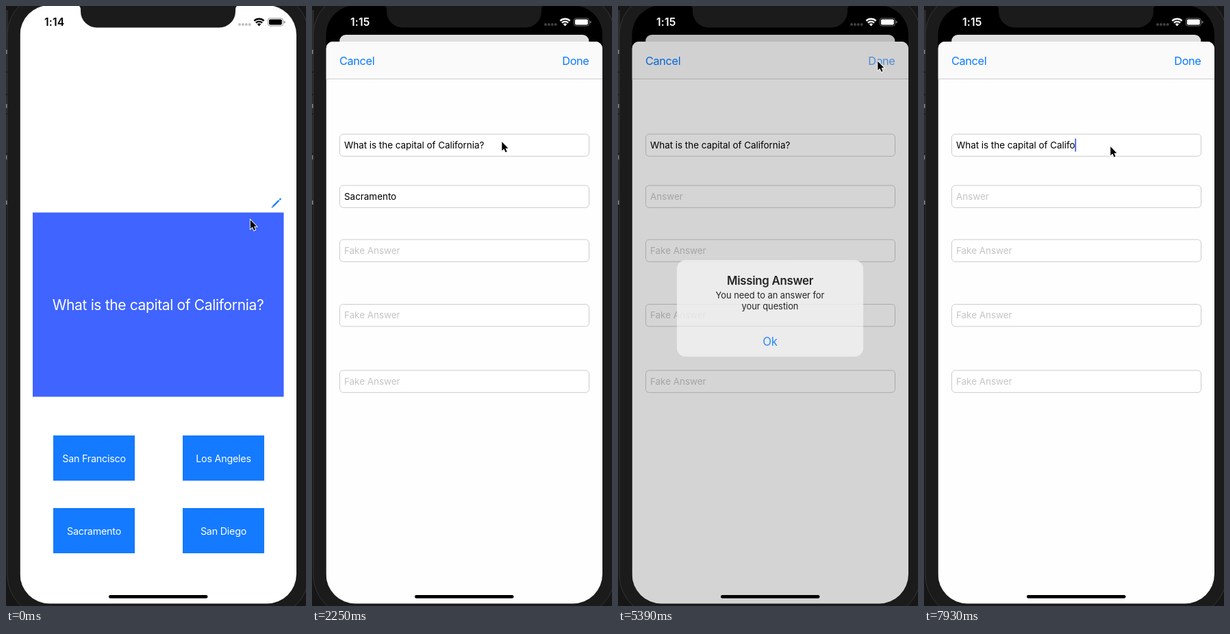
An HTML page that plays this animation: 438x876 px, repeating every 8000 ms.

```html
<!DOCTYPE html>
<html lang="en">
<head>
<meta charset="utf-8">
<title>Flashcard editor</title>
<style>
html, body { margin: 0; width: 100%; height: 100%; overflow: hidden; background: #111; }
svg { display: block; width: 438px; height: 876px; font-family: Inter, sans-serif; }
.mid { text-anchor: middle; }
.question { font-size: 21px; letter-spacing: -.35px; fill: #fff; }
.choice { font-size: 14.3px; letter-spacing: -.22px; fill: #fff; }
.field { font-size: 13.5px; letter-spacing: -.05px; }
.nav { font-size: 16.3px; letter-spacing: -.35px; fill: #0a7aff; }
.title { font-size: 16.3px; font-weight: 600; letter-spacing: -.27px; }
.message { font-size: 12.5px; letter-spacing: -.04px; }
.clock { font-size: 15.7px; font-weight: 600; letter-spacing: .15px; }
</style>
</head>
<body>
<svg viewBox="0 0 438 876">
  <defs>
    <clipPath id="screen"><rect x="20.5" y="-1" width="403.5" height="873.6" rx="43"/></clipPath>
  </defs>

  <rect width="438" height="876" fill="#161616"/>
  <rect y="6" width="3" height="284" fill="#2a2a2a"/>
  <path d="M0 96.5h3M0 129.5h3M0 157.5h3M0 215.5h3" stroke="#000"/>
  <path d="M0 67h2M0 146h2M0 221h1.5M0 287h2" stroke="#aaa" stroke-width="6" opacity=".7"/>
  <rect x="2" y="-18" width="440" height="909" rx="60" fill="#1b1b1b" stroke="#343434"/>

  <g clip-path="url(#screen)">
    <rect width="438" height="876"/>
    <g id="home">
      <rect id="page" width="403.5" height="880" fill="#fff"/>
      <g transform="translate(-20.5 0)">
        <g id="pencil" stroke="#147aff">
          <path d="M390 292.4L398.6 283.8" stroke-width="2.3"/>
          <path d="M388 294.4L390.2 292.2" stroke-width="1.4"/>
          <path d="M399.4 283L401.2 281.2" stroke-width="2.4"/>
        </g>
        <rect x="39" y="301.5" width="366.5" height="269" fill="#3f64ff"/>
        <text class="question mid" x="222" y="444">What is the capital of California?</text>
        <g id="choices"></g>
      </g>
    </g>
    <rect id="shade" width="438" height="876"/>

    <g id="sheet">
      <rect x="20.5" width="403.5" height="900" rx="10" fill="#fefefe"/>
      <path d="M20.5 54V10a10 10 0 0 1 10-10H414a10 10 0 0 1 10 10V54z" fill="#fafafa"/>
      <path d="M20 54.5H424" stroke="#cfcfcf"/>
      <text class="nav" x="40" y="33.5">Cancel</text>
      <text class="nav" id="done" x="404.5" y="33.5" text-anchor="end">Done</text>
      <g id="fields"></g>
      <rect id="caret" width="1.8" height="19" fill="#3d62e6"/>
    </g>

    <rect id="dim" width="438" height="876"/>
    <g id="alert">
      <rect x="90.2" y="373.2" width="263.6" height="136.6" rx="12.5" fill="#f0f1f0"/>
      <path d="M90.2 466.8H353.8" stroke="#d9d9db" stroke-width=".6"/>
      <text class="title mid" x="222" y="408">Missing Answer</text>
      <text class="message mid" x="222" y="427.6">You need to an answer for</text>
      <text class="message mid" x="222" y="443.2">your question</text>
      <text class="nav mid" id="ok" x="222" y="494.4">Ok</text>
    </g>

    <g id="status">
      <text class="clock" id="clock" x="56" y="29"></text>
      <path d="M341 27h.01M345.9 27h.01M350.8 27h.01M355.7 27h.01" stroke="currentColor"
        stroke-width="4" stroke-linecap="round" opacity=".25"/>
      <g fill="none" stroke="currentColor" stroke-width="2.3">
        <path d="M362.4 21.7a10 10 0 0 1 14.2 0"/>
        <path d="M364.9 24.6a6.5 6.5 0 0 1 9.2 0"/>
      </g>
      <path d="M369.5 29.4L366.9 26.6a3.7 3.7 0 0 1 5.2 0z" fill="currentColor"/>
      <rect x="382.4" y="17.9" width="22" height="11.2" rx="3.2" fill="none" stroke="currentColor" opacity=".4"/>
      <rect x="384" y="19.5" width="18.8" height="8" rx="1.8" fill="currentColor"/>
      <path d="M405.7 21.6a2 2 0 0 1 0 4z" fill="currentColor" opacity=".45"/>
    </g>
    <rect x="150" y="860" width="144.5" height="4.8" rx="2.4"/>
  </g>

  <path d="M103 -2Q109 -1 109 6V8A23.5 23.5 0 0 0 132.5 31.5H311.5A23.5 23.5 0 0 0 335 8V6Q335 -1 341 -2z" fill="#1b1b1b"/>
  <g id="mouse">
    <path d="M.8 1.2V14.3L3.8 11.6L6 16.6L8.1 15.7L6 10.8H9.9z"
      stroke="#fff" stroke-width="1.8" paint-order="stroke"/>
  </g>
</svg>

<script>
const LOOP = 8000;
const QUESTION = 'What is the capital of California?';
const ANSWER = 'Sacramento';
const $ = id => document.getElementById(id);
const set = (el, attrs) => { for (const k in attrs) el.setAttribute(k, attrs[k]); };
const ramp = (t, from, to) => Math.min(1, Math.max(0, (t - from) / (to - from)));
const smooth = u => u * u * (3 - 2 * u);

function add(parent, tag, attrs, text = '') {
  const el = document.createElementNS('http://www.w3.org/2000/svg', tag);
  set(el, attrs);
  el.textContent = text;
  parent.append(el);
  return el;
}

['San Francisco', 'Los Angeles', 'Sacramento', 'San Diego'].forEach((name, i) => {
  const x = 69 + 189 * (i % 2), y = 627 + 106 * (i >> 1);
  add($('choices'), 'rect', { x, y, width: 119, height: 66, fill: '#147aff' });
  add($('choices'), 'text', { class: 'choice mid', x: x + 59.5, y: y + 38.6 }, name);
});

const fieldY = [135, 210, 289, 383.5, 480];
const inputs = fieldY.map(y => {
  add($('fields'), 'rect', { x: 40.5, y, width: 364, height: 32.3, rx: 5, fill: '#fff', stroke: '#cbcbcb' });
  return add($('fields'), 'text', { class: 'field', x: 47, y: y + 20.8, fill: '#c5c5c7' }, 'Fake Answer');
});

// Pointer moves between a few stops
const moves = [
  { from: 0, to: 150, x: 360, y: 302 },
  { from: 300, to: 750, x: 391.5, y: 286.5 },
  { from: 1800, to: 2250, x: 276.5, y: 197 },
  { from: 2250, to: 2700, x: 194.5, y: 287 },
  { from: 4490, to: 5090, x: 378.5, y: 79.5 },
  { from: 5540, to: 6140, x: 222, y: 487 },
  { from: 6140, to: 6430, x: 251.5, y: 296.5 },
  { from: 6430, to: 6580, x: 262, y: 240 },
  { from: 6730, to: 6880, x: 271.5, y: 204 }
];

function pointer(t) {
  let x = 356, y = 311;
  for (const m of moves) {
    const u = smooth(ramp(t, m.from, m.to));
    x += (m.x - x) * u;
    y += (m.y - y) * u;
  }
  return `translate(${x} ${y})`;
}

// Time snapped to the screen's refresh steps
function snap(t) {
  const base = t < 4190 ? 0 : t < 6430 ? 4190 : 6430;
  return base + Math.floor((t - base) / 150) * 150;
}

// Remaining part of a critically damped spring, 1 to 0
function rest(t, start, end = Infinity) {
  if (t >= end) return 0;
  const x = Math.max(0, t - start) * .0112;
  return (1 + x) * Math.exp(-x);
}

// Opacity of a tapped control that fades back
const tapped = (t, start) => t < start ? 1 : .3 + .7 * ramp(t, start, start + 300);

// Text after the delete key goes down, then repeats once held
function erase(text, t, start, hold) {
  const held = t - start - hold;
  const gone = t < start ? 0 : held < 0 ? 1 : 2 + Math.floor(held / 70);
  return text.slice(0, Math.max(0, text.length - gone));
}

function fill(input, value, hint) {
  input.textContent = value || hint;
  set(input, { fill: value ? '#000' : '#c5c5c7' });
}

function drawSheet(t) {
  const left = rest(t, 1017, 1650), open = 1 - left;
  const inset = 19.7 * open;
  set($('home'), { transform: `translate(${20.5 + inset} ${42 * open}) scale(${1 - 2 * inset / 403.5})` });
  set($('page'), { rx: open > 0 ? 10 : 0 });
  set($('shade'), { opacity: .12 * open });
  set($('sheet'), { transform: `translate(0 ${52 + 824 * left})` });
  set($('pencil'), { opacity: tapped(t, 900) });
  set($('done'), { opacity: tapped(t, 5240) });

  const grey = Math.round(255 * ramp(t, 1150, 1530));
  const tone = `rgb(${grey},${grey},${grey})`;
  set($('status'), { color: tone, fill: tone });
  $('clock').textContent = t < 900 ? '1:14' : '1:15';
}

function drawFields(t) {
  const answer = erase(ANSWER, t, 3150, 450);
  fill(inputs[0], erase(QUESTION, t, 7480, 240), 'Question');
  fill(inputs[1], answer, 'Answer');

  const focus = t < 7030 ? 1 : 0;
  const hidden = t < 2850 || (t >= 5240 && t < 6430);
  const width = focus && !answer ? 0 : inputs[focus].getComputedTextLength();
  set($('caret'), { opacity: hidden ? 0 : 1, x: 46.8 + width, y: fieldY[focus] + 6.5 });
}

function drawAlert(t) {
  const closing = t >= 6162;
  const grow = closing ? 0 : rest(t, 5104);
  const shown = closing ? rest(t, 6162, 6580) : 1 - grow;
  set($('dim'), { opacity: .2 * shown });
  set($('alert'), {
    opacity: shown,
    transform: `translate(222 441.5) scale(${1 + .19 * grow}) translate(-222 -441.5)`
  });
  set($('ok'), { opacity: tapped(t, 6140) });
}

function draw(t) {
  drawSheet(t);
  drawFields(t);
  drawAlert(t);
  set($('mouse'), { transform: pointer(t) });
}

const start = performance.now();
function tick() {
  draw(snap((performance.now() - start) % LOOP));
  requestAnimationFrame(tick);
}
tick();
</script>
</body>
</html>
```
